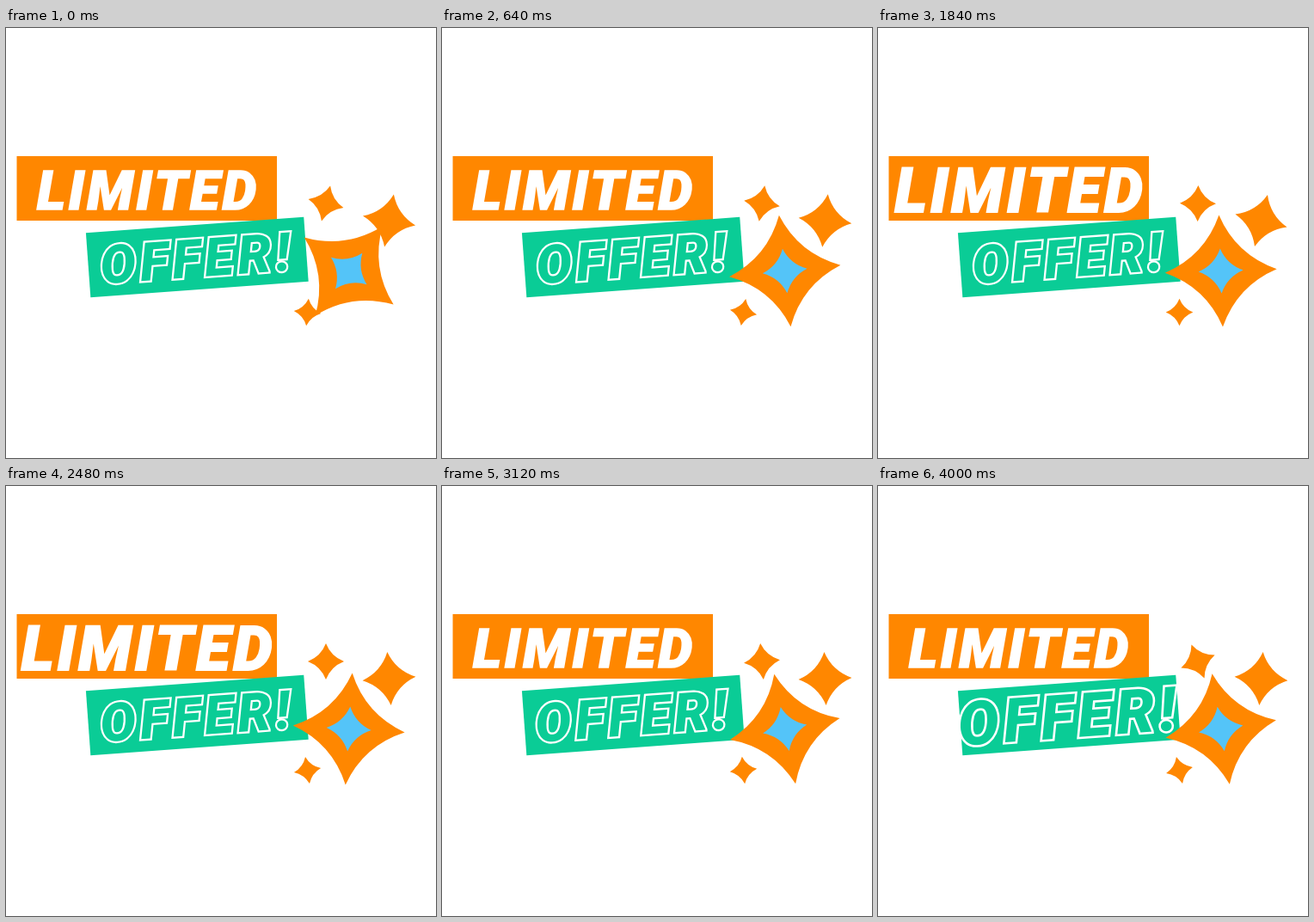
Write an HTML page that moves like this. It is 500x500 px and loops after 4.04 s.

```html
<!DOCTYPE html>
<html lang="en">
<head>
<meta charset="utf-8">
<title>Limited offer</title>
<style>
  html, body { margin: 0; width: 100%; height: 100%; overflow: hidden; background: #fff; }
  svg { display: block; width: 100%; height: 100%; }
  text {
    font: italic 900 63.3px Roboto, "Open Sans", sans-serif;
    text-anchor: middle;
    stroke: #fff;
    stroke-linejoin: miter;
    paint-order: stroke;
  }
  .solid { fill: #fff; stroke-width: 1.6; letter-spacing: 3.2px; }
  .outline { fill: #0acc96; stroke-width: 4.6; font-size: 62px; letter-spacing: 4.8px; }
</style>
</head>
<body>
<svg viewBox="0 0 500 500">
  <rect x="12.5" y="149" width="302.5" height="75" fill="#ff8700"/>
  <rect x="-127" y="-37.5" width="254" height="75" fill="#0acc96"
        transform="translate(222.3 266.5) rotate(-4.17)"/>
  <g id="limited"><text class="solid" x="2.2" y="22.5">LIMITED</text></g>
  <g id="offer"><text class="outline" x="1.4" y="22">OFFER!</text></g>
  <g id="stars"></g>
</svg>
<script>
const LOOP = 4040;
const GROW = 800;
const ORANGE = '#ff8700';
const BLUE = '#54c4f8';
const byId = id => document.getElementById(id);

// Times (ms) at which every star's tilt is given
const times = [0, 640, 1440, 1840, 2480, 3120, 4000];
const stars = [
  { x: 372, y: 204, r: 21, tilt: [14, 9, 3, 1, 0, -5, -21] },
  { x: 445.5, y: 224, r: 31, tilt: [10, 6, 21, 14, -4, -2, 4] },
  { x: 350.5, y: 330.5, r: 15.8, tilt: [5, 10, 10, 0, -9, -6, -13] },
  { x: 398.7, y: 282.5, r: 65, core: 26, spin: true, tilt: [-53, -6, -11, -2, 3.5, -11, -9] }
];

const easeOut = p => 1 - (1 - p) ** 3;
const smooth = p => p * p * (3 - 2 * p);

function starPath(r) {
  const c = r * 0.28;
  return `M0 ${-r}Q${c} ${-c} ${r} 0Q${c} ${c} 0 ${r}Q${-c} ${c} ${-r} 0Q${-c} ${-c} 0 ${-r}Z`;
}

function addPath(parent, r, fill) {
  const path = document.createElementNS('http://www.w3.org/2000/svg', 'path');
  path.setAttribute('d', starPath(r));
  path.setAttribute('fill', fill);
  parent.append(path);
}

for (const s of stars) {
  s.el = document.createElementNS('http://www.w3.org/2000/svg', 'g');
  addPath(s.el, s.r, ORANGE);
  if (s.core) addPath(s.el, s.core, BLUE);
  byId('stars').append(s.el);
}

function tiltAt(star, t) {
  let i = 0;
  while (i < times.length - 2 && t >= times[i + 1]) i++;
  const p = Math.min(1, (t - times[i]) / (times[i + 1] - times[i]));
  const ease = star.spin && i === 0 ? easeOut : smooth;
  return star.tilt[i] + (star.tilt[i + 1] - star.tilt[i]) * ease(p);
}

// Quick growth, then the same curve backwards
function pulse(t, start) {
  const p = 1 - Math.abs(t - start - GROW) / GROW;
  return 1 + 0.148 * (p > 0 ? easeOut(p) : 0);
}

function draw(t) {
  byId('limited').setAttribute('transform',
    `translate(163 188.5) scale(${pulse(t, 1440)})`);
  byId('offer').setAttribute('transform',
    `translate(220.5 267.5) rotate(-4.17) scale(${pulse(t, 3100)})`);
  for (const s of stars) {
    s.el.setAttribute('transform', `translate(${s.x} ${s.y}) rotate(${tiltAt(s, t)})`);
  }
}

const start = performance.now();
function tick() {
  const t = (performance.now() - start) % LOOP;
  const step = t < 560 ? 40 : 80;
  draw(Math.floor(t / step) * step);
  requestAnimationFrame(tick);
}
draw(0);
requestAnimationFrame(tick);
</script>
</body>
</html>
```
